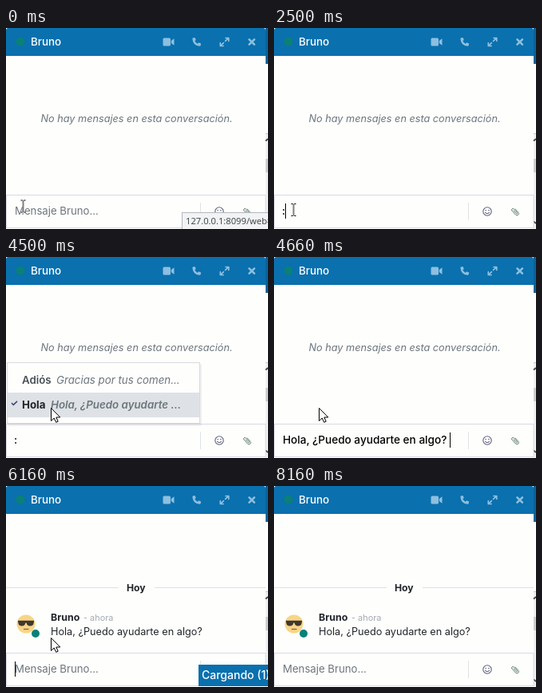
Animation of 328x252 px, one loop 8.33 s. Source, as an HTML page:

```html
<!DOCTYPE html>
<html lang="es">
<head>
<meta charset="utf-8">
<title>Chat</title>
<style>
html, body { margin: 0; width: 100%; height: 100%; overflow: hidden; background: #fefefd; }
svg { display: block; width: 100%; height: 100%; }
text { font-family: Inter, sans-serif; font-size: 12.7px; fill: #212529; white-space: pre; }
.mid { font-size: 13.3px; }
.input { font-size: 13.6px; font-weight: 500; fill: #000; }
.bold { font-weight: 700; }
.semi { font-weight: 600; }
.it { font-style: italic; }
.grey { fill: #6c757d; }
.white { fill: #fff; font-weight: 500; }
.line { fill: none; stroke: currentColor; stroke-width: 1.1; stroke-linecap: round; stroke-linejoin: round; }
.solid { fill: currentColor; }

/* Everything changes in hard steps on one shared loop */
.step { animation: 8.33s step-end infinite; }
#empty { animation-name: empty; }
#status { animation-name: status; }
#hint { animation-name: hint; }
#colon { animation-name: colon; }
#reply { animation-name: reply; }
#menu { animation-name: menu; }
#pickBye { animation-name: pickBye; }
#pickHi { animation-name: pickHi; }
#loading { animation-name: loading; }
#message { animation-name: message; }
.hover { animation-name: hover; }
#caret { animation-name: caretX, caretBlink; }
#beam { animation-name: beamMove, beamShow; }
#arrow { animation-name: arrowMove, arrowShow; }

@keyframes empty { 0% { opacity: 1 } 73.94%, 100% { opacity: 0 } }
@keyframes status { 0% { opacity: 1 } 6% { opacity: .66 } 7.92% { opacity: .33 } 9.96%, 100% { opacity: 0 } }
@keyframes hint { 0% { opacity: 1 } 30.01% { opacity: 0 } 73.94%, 100% { opacity: 1 } }
@keyframes colon { 0% { opacity: 0 } 30.01% { opacity: 1 } 55.94%, 100% { opacity: 0 } }
@keyframes reply { 0% { opacity: 0 } 55.94% { opacity: 1 } 73.94%, 100% { opacity: 0 } }
@keyframes menu { 0% { opacity: 0 } 31.93% { opacity: 1 } 55.94%, 100% { opacity: 0 } }
@keyframes pickBye { 0% { opacity: 1 } 51.98%, 100% { opacity: 0 } }
@keyframes pickHi { 0% { opacity: 0 } 51.98%, 100% { opacity: 1 } }
@keyframes loading { 0% { opacity: 0 } 69.98% { opacity: 1 } 78.03%, 100% { opacity: 0 } }
@keyframes message { 0% { opacity: 0 } 73.94%, 100% { opacity: 1 } }
@keyframes hover { 0% { opacity: 0 } 78.03% { opacity: 1 } 90.03%, 100% { opacity: 0 } }
@keyframes caretX {
  0% { transform: translateX(11px) }
  30.01% { transform: translateX(14px) }
  55.94% { transform: translateX(220px) }
  73.94%, 100% { transform: translateX(11px) }
}
@keyframes caretBlink {
  0%, 13.92%, 25.93%, 39.97%, 61.94%, 79.95%, 91.95%, 100% { opacity: 0 }
  7.92%, 19.92%, 30.01%, 55.94%, 69.98%, 85.95% { opacity: 1 }
}
@keyframes beamMove {
  0% { transform: translate(21.5px, 223.5px) }
  1.92% { transform: translate(24.5px, 228px) }
  45.97% { transform: translate(28.5px, 223px) }
  48.01%, 100% { transform: translate(33.5px, 216px) }
}
@keyframes beamShow { 0% { opacity: 1 } 49.93%, 100% { opacity: 0 } }
@keyframes arrowMove {
  0% { transform: translate(42px, 203px) }
  51.98% { transform: translate(51px, 194px) }
  54.02% { transform: translate(56px, 189px) }
  61.94% { transform: translate(56px, 190px) }
  87.99% { transform: translate(62px, 174px) }
  90.03% { transform: translate(96px, 96px) }
  91.95%, 100% { transform: translate(150px, 8px) }
}
@keyframes arrowShow { 0% { opacity: 0 } 49.93% { opacity: 1 } 93.99%, 100% { opacity: 0 } }
</style>
</head>
<body>
<svg viewBox="0 0 328 252">
  <defs>
    <g id="smile">
      <circle r="5.2" class="line"/>
      <circle cx="-1.9" cy="-1.4" r=".8" class="solid"/>
      <circle cx="1.9" cy="-1.4" r=".8" class="solid"/>
      <path d="M-2.5 1.4Q0 4 2.5 1.4" class="line"/>
    </g>
    <path id="check" d="M7 152l2.300 2.300L14 149.800" fill="none" stroke="#3f4a78" stroke-width="1.600"/>
    <path id="ibeam" d="M-3-7.500H-1L0-6.500 1-7.500H3M0-6.500V6.500M-3 7.500H-1L0 6.500 1 7.500H3"/>
  </defs>

  <!-- Page behind the chat window -->
  <rect width="328" height="252" fill="#fefefd"/>
  <rect x="325" width="3" height="45" fill="#0a629b"/>
  <rect x="325" y="132" width="3" height="120" fill="#f0f0f0"/>
  <rect x="325" y="132" width="3" height="1" fill="#c8c8c8"/>
  <rect x="325" y="164" width="3" height="17" fill="#cdcdcd"/>
  <path d="M325 141.500l3-2.500M325 242.500l3 2.500" stroke="#444" stroke-width="1.800" fill="none"/>

  <!-- Window header -->
  <path d="M0 35V3Q0 0 3 0H322Q325 0 325 3V35Z" fill="#0a70ae"/>
  <circle cx="18" cy="17" r="5.500" fill="#0a8078"/>
  <text x="31" y="22" class="white" style="font-size:13.4px">Bruno</text>
  <g color="#8dbfdf">
    <path d="M198 12.500h6.500q1.500 0 1.500 1.500v7q0 1.500-1.500 1.500H198q-1.500 0-1.500-1.500v-7q0-1.500 1.500-1.500ZM206.800 16l3.700-2.700v8.400l-3.700-2.700Z" class="solid"/>
    <path d="M234 12.500l2.500-.6 1.300 3-1.500 1.400q1.200 2.400 3.500 3.500l1.400-1.500 3 1.300-.6 2.500q-.3.700-1 .7Q233.700 22 233.400 13.400q0-.7.600-.9Z" class="solid"/>
    <path d="M274.600 16.400l3.600-3.600M275 12.500h3.800v3.800M272.400 18.600l-3.600 3.600M268.300 18.700v3.800h3.800" class="line" style="stroke-width:1.700"/>
    <path d="M304.500 14.300l6.400 6.400M310.900 14.300l-6.400 6.400" class="line" style="stroke-width:2.600"/>
  </g>

  <text id="empty" class="step it grey" x="43.500" y="118">No hay mensajes en esta conversación.</text>

  <!-- Posted message -->
  <g id="message" class="step">
    <rect class="step hover" y="152" width="325" height="39" fill="#f7f7fb"/>
    <path d="M0 127.500H141M186 127.500H325" stroke="#dee2e6"/>
    <text x="151" y="132" class="bold" style="font-size:12.2px">Hoy</text>
    <rect x="7" y="155" width="36" height="35" fill="#fefefd"/>
    <circle cx="25" cy="173" r="11.500" fill="#f8d587"/>
    <path d="M15 168.800H35V170.500L34 174Q30 177 26.500 174L25.500 171.500H24.500L23.500 174Q20 177 16 174L15 170.500Z" fill="#40382f"/>
    <path d="M22 179.500H28.500" stroke="#8a6a3c" stroke-width="1.300"/>
    <circle cx="37" cy="185" r="5" fill="#0a8078"/>
    <text x="56" y="169" class="bold" style="font-size:12.4px">Bruno</text>
    <text x="97" y="169" style="font-size:10.9px;fill:#a4abb2">- ahora</text>
    <text x="56" y="187">Hola, ¿Puedo ayudarte en algo?</text>
    <g class="step hover" color="#212529">
      <rect x="180.500" y="140.500" width="132" height="25" rx="1.500" fill="#fff" stroke="#d3d7dc"/>
      <use href="#smile" transform="translate(194 153) scale(1.25)"/>
      <path d="M220 146.500l2.100 4.300 4.700.7-3.400 3.300.8 4.700-4.200-2.200-4.200 2.200.8-4.700-3.400-3.300 4.700-.7Z" class="line" style="stroke-width:1.400"/>
      <path d="M239.500 151.500l6.300-5.500v3.300q9.200.2 9.200 5.700 0 3-2.700 5 1.500-6.200-6.500-6.300v3.400Z" class="solid"/>
      <path d="M267.500 159.500l.8-3.800 7.300-7.300 3 3-7.300 7.300ZM276.500 147.500l1.200-1.200q.7-.6 1.400 0l1.700 1.700q.6.700 0 1.400l-1.200 1.200Z" class="solid"/>
      <path d="M294 147.300h3.600l.8-1.300h3.400l.8 1.300h3.600v1.700H294ZM295 150h10.200l-.6 9q-.1 1-1.100 1h-6.800q-1 0-1.100-1Z" class="solid"/>
      <path d="M297.900 152v6M300.100 152v6M302.300 152v6" stroke="#fff" stroke-width=".8"/>
    </g>
  </g>

  <!-- Composer -->
  <rect x=".5" y="209.500" width="324.500" height="41" fill="#fefefd" stroke="#d9dae6"/>
  <path d="M243.500 219V241" stroke="#dee2e6"/>
  <use href="#smile" x="267" y="230" color="#5f6080"/>
  <path transform="translate(302 230.300) rotate(-42)" d="M2.200-2.500V3.200A2.200 2.200 0 0 1-2.200 3.200V-3.600A1.600 1.600 0 0 1 1-3.600V2.600A.6.6 0 0 1-.6 2.600V-2.300" class="line" color="#5d7b6c" style="stroke-width:.9"/>
  <text id="hint" class="step grey" x="11" y="234" style="font-size:13.2px">Mensaje Bruno...</text>
  <text id="colon" class="step input" x="10" y="234">:</text>
  <text id="reply" class="step input" x="11" y="234">Hola, ¿Puedo ayudarte en algo?</text>
  <rect id="caret" class="step" y="220" width="1" height="19" fill="#000"/>

  <!-- Canned replies -->
  <g id="menu" class="step">
    <rect x="2" y="134" width="243" height="78" rx="2" fill="#000" opacity=".06"/>
    <rect x="1.500" y="132.500" width="241" height="76" fill="#fefefd" stroke="#d8dbdf"/>
    <g id="pickBye" class="step">
      <rect x="2" y="139" width="240" height="31" fill="#dee2e6"/>
      <use href="#check"/>
      <text x="20" y="159" class="mid bold">Adiós</text>
      <text x="63" y="159" class="mid semi it grey">Gracias por tus comen...</text>
      <text x="20" y="190" class="mid semi" style="fill:#495057">Hola</text>
      <text x="56" y="190" class="mid it grey">Hola, ¿Puedo ayudarte e...</text>
    </g>
    <g id="pickHi" class="step">
      <rect x="2" y="170" width="240" height="31" fill="#dee2e6"/>
      <use href="#check" y="31"/>
      <text x="20" y="159" class="mid semi" style="fill:#495057">Adiós</text>
      <text x="63" y="159" class="mid it grey">Gracias por tus comen...</text>
      <text x="20" y="190" class="mid bold">Hola</text>
      <text x="56" y="190" class="mid semi it grey">Hola, ¿Puedo ayudarte ...</text>
    </g>
  </g>

  <g id="loading" class="step">
    <rect x="241" y="224" width="87" height="27" fill="#0a70ae"/>
    <text x="245" y="242" class="white" style="font-size:14px">Cargando (1)</text>
  </g>
  <g id="status" class="step">
    <rect x="220.500" y="231.500" width="120" height="30" fill="#f1f3f4" stroke="#b4b8bd"/>
    <text x="225" y="246" style="font-family:'Open Sans',sans-serif;font-size:11.2px;fill:#3c4043">127.0.0.1:8099/web#</text>
  </g>

  <!-- Pointers -->
  <g id="beam" class="step" fill="none">
    <use href="#ibeam" stroke="#fff" stroke-width="2.400"/>
    <use href="#ibeam" stroke="#000"/>
  </g>
  <path id="arrow" class="step" d="M.5.5V16.500L4.200 13 6.700 18.300 9.200 17.200 6.800 12H11.800Z" fill="#fff" stroke="#000"/>
</svg>
</body>
</html>
```
